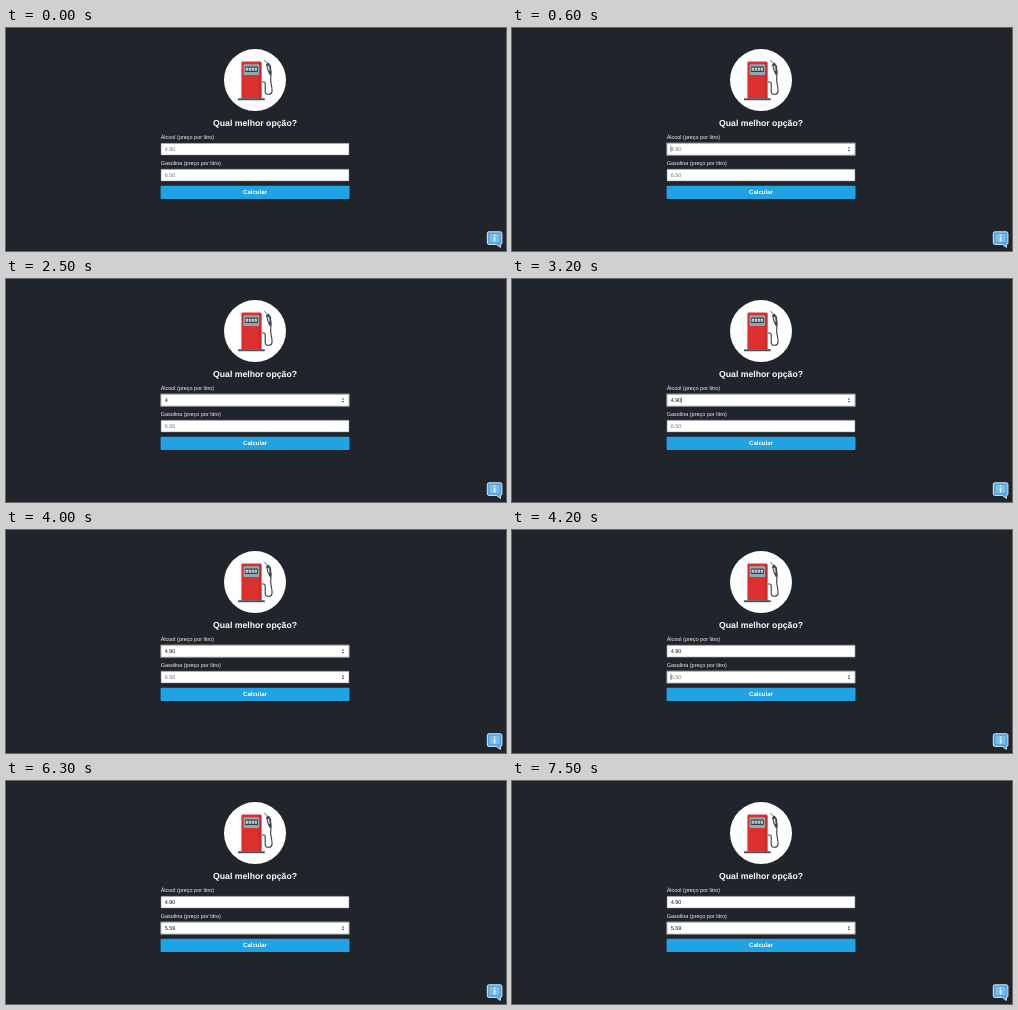
Animation, 500 px wide and 223 px high, one loop 8 s. Source, as an HTML page:

```html
<!DOCTYPE html>
<html lang="pt">
<head>
<meta charset="utf-8">
<title>Qual melhor opção?</title>
<style>
  html, body { margin: 0; width: 100%; height: 100%; overflow: hidden; background: #20252c; }
  svg { display: block; width: 100vw; height: 100vh; }
  text { font: 5.47px "Liberation Sans", Arial, sans-serif; fill: #f4f4f4; text-rendering: geometricPrecision; }
  .title { font-size: 8.7px; font-weight: bold; text-anchor: middle; fill: #fff; }
  .button { font-size: 6.05px; font-weight: bold; text-anchor: middle; fill: #fff; }
</style>
</head>
<body>
<svg viewBox="0 0 500 223">
  <rect width="500" height="223" fill="#20252c"/>
  <circle cx="249" cy="52.1" r="31" fill="#fefefe"/>

  <g id="pump">
    <path d="M256 54h1.7q1.5 0 1.5 1.7v7.2q0 3.4 3.3 3.4t3.6-3.4q0-3-1-7.2-.8-3.2-.2-7.5.6-4.2-.4-7.2l-2.3-4.2" fill="none" stroke="#343a43" stroke-width="1.1"/>
    <path d="M258.2 32.2l3.7 3.7" stroke="#8d949c" stroke-width="1.1"/>
    <path d="M260 36.5l2.5-2.1 2.6 3.7v7.4q0 1.6-1.4 1.6l-2.2-4.6z" fill="#3d444d"/>
    <path d="M261.5 38.2l1.6-.7 .6 5.5-1.1-.2z" fill="#dce1e4"/>
    <rect x="235.4" y="33.6" width="20" height="37" rx="1.4" fill="#dc302f"/>
    <path d="M253 34h1.1q1.3 0 1.3 1.3v35.3H253z" fill="#c62b2d"/>
    <rect x="237.6" y="36.2" width="15.6" height="10.8" rx=".8" fill="#8da9b2"/>
    <rect x="238.9" y="38.6" width="13" height="5.3" rx=".5" fill="#364149"/>
    <g fill="#e9eff0">
      <rect x="239.7" y="39.7" width="2.1" height="3"/>
      <rect x="242.7" y="39.7" width="2.1" height="3"/>
      <rect x="245.7" y="39.7" width="2.1" height="3"/>
      <rect x="248.7" y="39.7" width="2.1" height="3"/>
    </g>
    <path d="M240.4 41.2h.7m2.3 0h.7m2.3 0h.7m2.3 0h.7" stroke="#364149" stroke-width=".8"/>
    <rect x="232" y="70.2" width="26.8" height="2" rx=".5" fill="#4d545c"/>
  </g>

  <text class="title" x="249" y="97.5">Qual melhor opção?</text>
  <text x="154.7" y="111.1">Álcool (preço por litro)</text>
  <text x="154.7" y="137">Gasolina (preço por litro)</text>
  <g id="fields"></g>
  <rect x="154.6" y="157.8" width="188.9" height="13.2" rx="1" fill="#20a2e3"/>
  <text class="button" x="249" y="166.4">Calcular</text>

  <path d="M482.8 203.8h11.6q1.5 0 1.5 1.5v9.6q0 1.5-1.5 1.5v3l-4-3h-7.6q-1.5 0-1.5-1.5v-9.6q0-1.5 1.5-1.5z" fill="#55a4df" stroke="#d7ebf8" stroke-width="1"/>
  <rect x="483.7" y="206" width="9.8" height="8" fill="#78bdeb"/>
  <path d="M488.6 206.3v1.5m0 1v4.7" stroke="#e4f3fc" stroke-width="1.6"/>
</svg>
<script>
  const LOOP = 8000;
  const NS = 'http://www.w3.org/2000/svg';
  const root = document.getElementById('fields');

  function add(parent, tag, attrs) {
    const el = document.createElementNS(NS, tag);
    for (const key in attrs) el.setAttribute(key, attrs[key]);
    return parent.appendChild(el);
  }

  // Steps are [time, value]; the latest one reached applies.
  function at(steps, t) {
    let value = steps[0][1];
    for (const [time, v] of steps) if (t >= time) value = v;
    return value;
  }

  function makeField(y, spec) {
    const ring = add(root, 'rect', { x: 154.2, y: y - .5, width: 189.6, height: 13.4, rx: 1, fill: '#8c8684' });
    add(root, 'rect', { x: 155, y: y + .3, width: 188, height: 11.8, rx: .4, fill: '#fff', stroke: '#777b80', 'stroke-width': .5 });
    const text = add(root, 'text', { x: 158.7, y: y + 8.1 });
    const caret = add(root, 'rect', { y: y + 3.1, width: .45, height: 6.1, fill: '#111' });
    const spin = add(root, 'path', {
      d: `M335.7 ${y + 5.6}l1.3-1.6 1.3 1.6zm0 1.3l1.3 1.6 1.3-1.6z`, fill: '#454545'
    });
    return { ...spec, ring, text, caret, spin };
  }

  const fields = [
    makeField(115, {
      hint: '4.90',
      typed: [[0, ''], [1900, '4'], [2700, '4.'], [3000, '4.9'], [3200, '4.90']],
      caretOn: [[0, 0], [600, 1], [1100, 0], [1800, 1], [2500, 0], [2700, 1], [3800, 0]],
      spinOn: [[0, 0], [100, 1], [4200, 0]],
      focus: [[0, 0], [600, 1], [4200, .3], [4300, 0]]
    }),
    makeField(140.9, {
      hint: '6.50',
      typed: [[0, ''], [5100, '5'], [5400, '5.'], [5500, '5.5'], [5700, '5.59']],
      caretOn: [[0, 0], [4200, 1], [4800, 0], [5100, 1], [6300, 0], [6900, 1], [7500, 0]],
      spinOn: [[0, 0], [4000, 1]],
      focus: [[0, 0], [4200, .8], [4300, 1]]
    })
  ];

  const charWidth = c => 5.47 * (c === '.' ? .278 : .556);

  function draw(t) {
    for (const f of fields) {
      const typed = at(f.typed, t);
      f.text.textContent = typed || f.hint;
      f.text.style.fill = typed ? '#111' : '#777';
      f.caret.setAttribute('x', [...typed].reduce((x, c) => x + charWidth(c), 158.7));
      f.caret.style.opacity = at(f.caretOn, t);
      f.spin.style.opacity = at(f.spinOn, t);
      f.ring.style.opacity = at(f.focus, t);
    }
  }

  const start = performance.now();
  function tick() {
    draw((performance.now() - start) % LOOP);
    requestAnimationFrame(tick);
  }
  tick();
</script>
</body>
</html>
```
